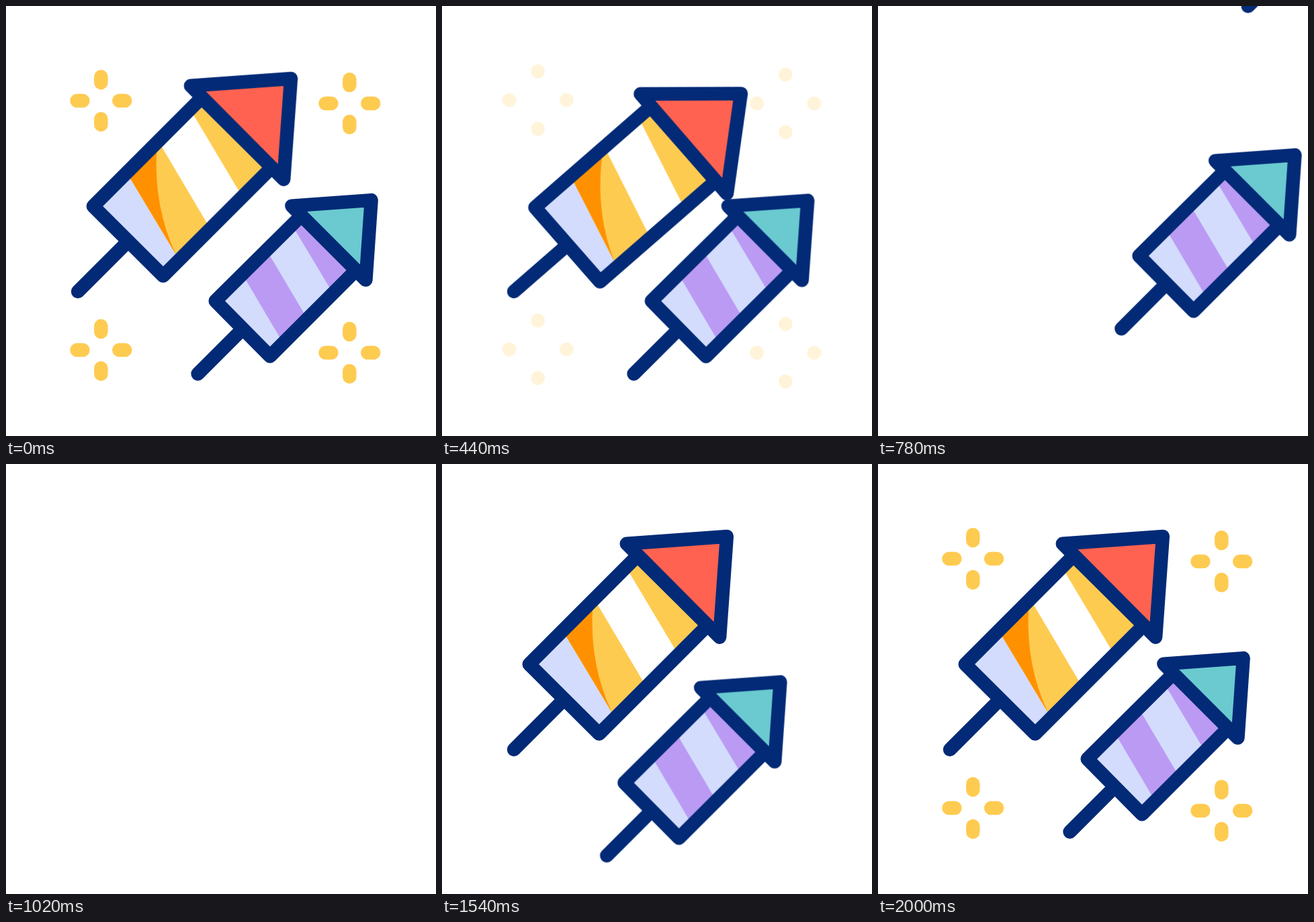
An HTML page that plays this animation: 640 px wide and 640 px high, repeating every 2.02 s.

```html
<!DOCTYPE html>
<html lang="en">
<head>
<meta charset="utf-8">
<title>Firework rockets</title>
<style>
  html, body { margin: 0; width: 100%; height: 100%; overflow: hidden; background: #fff; }
  svg { display: block; width: 100vw; height: 100vh; }

  .rocket { stroke-linejoin: round; stroke-linecap: round; }
  .line { fill: none; stroke: #032a76; stroke-width: 20.3; }
  .navy { stroke: #032a76; stroke-width: 20.3; }
  .pale { fill: #d3dcfd; }
  .yellow { fill: #fecb51; }
  .orange { fill: #ff9100; }
  .white { fill: #fff; }
  .purple { fill: #bb9af3; }
  .red { fill: #ff6250; }
  .teal { fill: #6acad0; }

  .fly, .shake, .sparks, .drift { animation: 2020ms linear infinite; }
  .fly.big { animation-name: fly-big; }
  .fly.small { animation-name: fly-small; }
  .shake { animation-name: shake; }
  .big .shake { transform-origin: 107px 425px; }
  .small .shake { transform-origin: 285.5px 547.5px; animation-delay: 200ms; }

  .sparks {
    animation-name: spark;
    fill: none; stroke: #fecb51; stroke-width: 20.5; stroke-linecap: round;
    stroke-dasharray: 8.9px 99px;
  }
  .drift { animation-name: drift; }

  /* growing wobble before launch */
  @keyframes shake {
    0% { transform: rotate(0deg); }
    3.96% { transform: rotate(2.9deg); }
    8.911% { transform: rotate(-7.5deg); }
    15.842% { transform: rotate(10deg); }
    25.743%, 100% { transform: rotate(0deg); }
  }

  /* leave at the top right, come back from the bottom left */
  @keyframes fly-big {
    0%, 25.792% { transform: translate(0, 0); }
    40.644% { transform: translate(512px, -490px); animation-timing-function: step-end; }
    55.446% { transform: translate(-451.6px, 426.7px); animation-timing-function: cubic-bezier(.3333, .6667, .6667, 1); }
    72.277%, 100% { transform: translate(0, 0); }
  }
  @keyframes fly-small {
    0%, 35.693% { transform: translate(0, 0); }
    50.545% { transform: translate(384px, -336px); animation-timing-function: step-end; }
    61.386% { transform: translate(-527px, 463px); animation-timing-function: cubic-bezier(.3333, .6667, .6667, 1); }
    81.98%, 100% { transform: translate(0, 0); }
  }

  @keyframes spark {
    0% { opacity: 1; stroke-dasharray: 8.9px 99px; stroke-dashoffset: 0px; }
    12.871% { opacity: .71; stroke-dasharray: 3px 99px; stroke-dashoffset: -12px; }
    16.832% { stroke-dasharray: .5px 99px; stroke-dashoffset: -15.5px; }
    25.743% { opacity: 0; stroke-dasharray: .5px 99px; stroke-dashoffset: -15.5px; animation-timing-function: step-end; }
    82.178% { opacity: 0; stroke-dasharray: .1px 99px; stroke-dashoffset: 0px; }
    99.01%, 100% { opacity: 1; stroke-dasharray: 8.9px 99px; stroke-dashoffset: 0px; }
  }
  @keyframes drift {
    0% { transform: translate(0, 0); }
    12.871%, 25.743% { transform: translate(1.5px, -1px); }
    25.744%, 100% { transform: translate(0, 0); }
  }
</style>
</head>
<body>
<svg viewBox="0 0 640 640">
  <defs>
    <path id="dash" d="M0-26.9V-43"/>
    <g id="burst">
      <use href="#dash"/>
      <use href="#dash" transform="rotate(90)"/>
      <use href="#dash" transform="rotate(180)"/>
      <use href="#dash" transform="rotate(270)"/>
    </g>
  </defs>

  <g class="sparks">
    <g class="drift">
      <use href="#burst" x="141.3" y="141"/>
      <use href="#burst" x="141.3" y="512"/>
    </g>
    <use href="#burst" x="511.3" y="145"/>
    <use href="#burst" x="511.3" y="516"/>
  </g>

  <g class="rocket fly big">
    <g class="shake">
      <path class="line" d="M107 425L182 350"/>
      <path class="white" d="M129.7 298L234 401.7L395.5 240L291 136.5Z"/>
      <path class="pale" d="M129.7 298L234 401.7L258.4 378.9L179.6 248.1Z"/>
      <path class="yellow" d="M179.6 248.1L258.4 378.9L304.4 331.9L226.6 201.1Z"/>
      <path class="yellow" d="M273.6 153.1L352.4 284.9L395.5 240L291 136.5Z"/>
      <path class="orange" d="M179.6 248.1L225 203L224 217Q220 300 253 370Z"/>
      <path class="line" d="M129.7 298L234 401.7L395.5 240L291 136.5Z"/>
      <path class="navy red" d="M274.7 118.7L423.9 107.8L413.2 257.8Z"/>
    </g>
  </g>

  <g class="rocket fly small">
    <g class="shake">
      <path class="line" d="M285.5 547.5L352 481"/>
      <path class="pale" d="M311.6 439L393 521.3L521.3 393L440 311.6Z"/>
      <path class="purple" d="M351.7 399.1L413.3 502.9L449.3 466.9L387.7 363.1Z"/>
      <path class="purple" d="M425.7 326.1L486.3 426.9L521.3 393L440 311.6Z"/>
      <path class="line" d="M311.6 439L393 521.3L521.3 393L440 311.6Z"/>
      <path class="navy teal" d="M425.3 297.5L543.7 289L535.5 407.7Z"/>
    </g>
  </g>
</svg>
</body>
</html>
```
